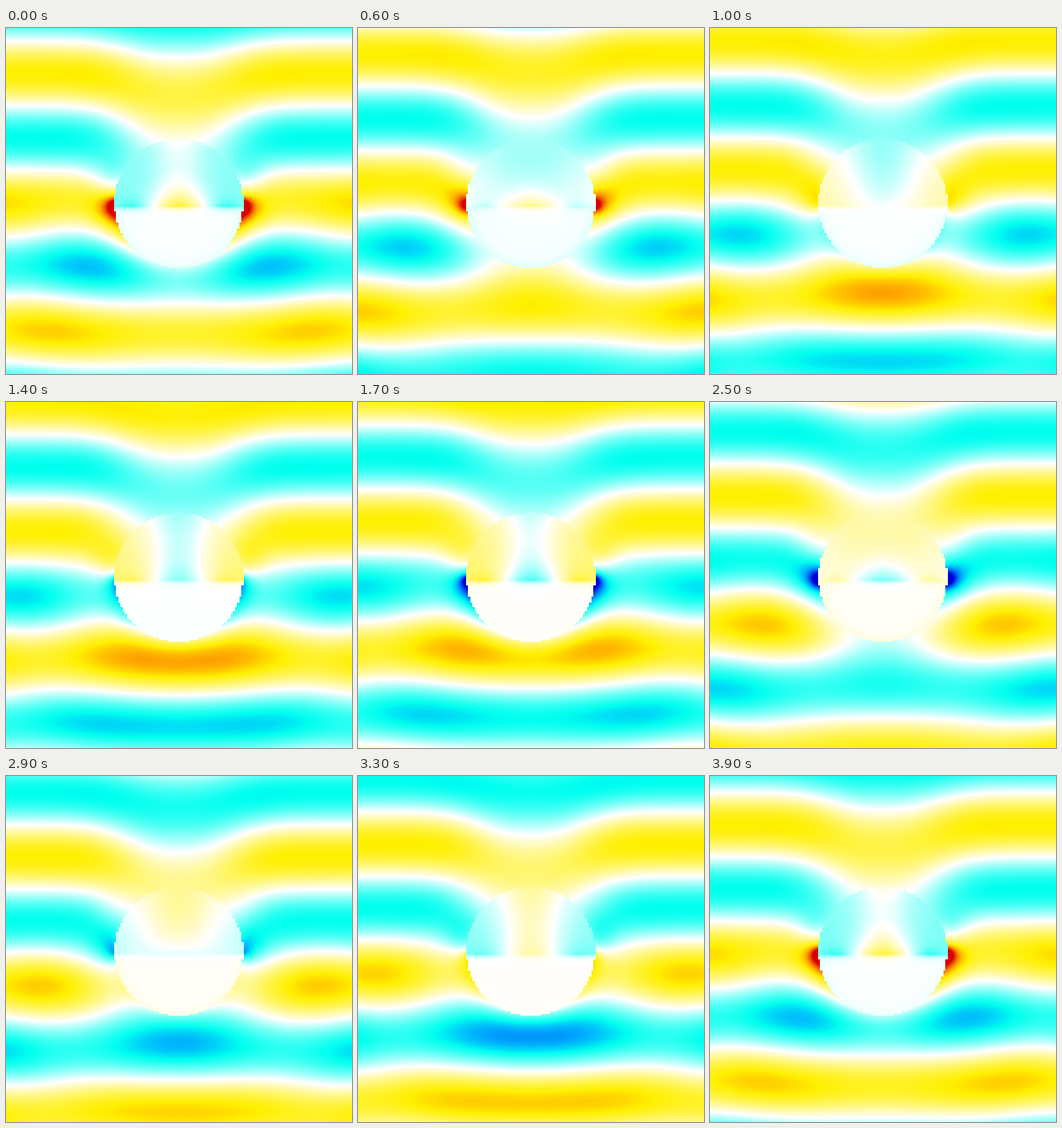
Recreate the animation shown at these times as a matplotlib script. Size 400 px wide and 400 px high, loop 4 s.

```python
import numpy as np
import matplotlib.pyplot as plt
from matplotlib.animation import FuncAnimation
from matplotlib.colors import LinearSegmentedColormap

SIZE, CELL = 400, 2.5
FRAMES, INTERVAL = 40, 100
CX, CY, RADIUS, BASE = 200, 203, 74.5, 206
WAVELENGTH, CREST = 149, 52.5
K = 2 * np.pi / WAVELENGTH


def bell(x, width):
    return np.exp(-(x / width) ** 2)


def polar(size, degrees):
    return size * np.exp(1j * np.radians(degrees))


def outer_field(d, y):
    """Plane wave going up, disturbed by the disc; complex amplitude."""
    r = np.hypot(d, y - CY)
    rise = CY - y

    # Wide, flat-fronted beam behind the disc
    beam = polar(1.2 * bell(rise - 73, 140) * np.exp(-(d / 80) ** 2.6),
                 -159 + 0.42 * (rise - 73) + 0.003 * d ** 2)
    # Round wave thrown back towards the incoming one
    echo = 0.15 + 0.78 * np.exp(-np.maximum(r - 74, 0) / 28)
    echo = echo * np.exp(-1j * K * (r - rise - 210))
    back = 1 / (1 + np.exp((198 - y) / (r / 12 + 1)))
    # Delay along the flanks
    flank = -0.4j * bell(d - 78, 25) * bell(y - 180, 32)

    tip = np.hypot(d - RADIUS, y - 205)
    total = 1 + (1 - back) * beam + back * echo + flank
    total = total * (1 + 1.25 * np.exp(-tip / 9))
    return total * np.exp(1j * K * (y - CREST))


def inner_field(d, y):
    """Weak standing pattern in the upper half, nearly nothing below."""
    h = np.maximum(BASE - y, 0)
    depth = np.maximum(y - BASE, 0)
    p = h / 75
    dome = 0.78 * bell(d, 29) * np.exp(-h / 22)
    strip = 0.4 * bell(d - 54, 15) * np.exp(-h / 7)
    sides = 0.46 * (1 - bell(d, 35))
    neck = 0.8 * p * (1 - p) * bell(d, 40)
    a = dome - strip - sides - neck
    b = 0.33 * (1 - bell(d, 45)) * (1 - p ** 2)
    b = b - 0.5 * bell(d, 42) * (1 - np.exp(-h / 40))

    rim = np.exp((np.hypot(d, y - CY) - RADIUS) / 6)
    tint = (depth > 0) * (0.025 + 0.12 * rim) * (-0.7 + 0.7j)
    return (a - 1j * b) * np.exp(-depth / 3) + tint


pixels = np.arange(SIZE) + 0.5
X, Y = np.meshgrid(pixels, pixels)
D = np.abs(X - CX)

# The disc's edge follows a coarser grid
cells = (np.floor(pixels / CELL) + 0.5) * CELL
CELL_X, CELL_Y = np.meshgrid(cells, cells)
disc = np.hypot(CELL_X - CX, CELL_Y - CY) < RADIUS
field = np.where(disc, inner_field(D, Y), outer_field(D, Y))

LIMIT = 2
COLORS = [
    (-2, (0, 0, 0.85)), (-1.35, (0, 0.66, 1)), (-1, (0, 1, 0.94)),
    (0, (1, 1, 1)),
    (1, (1, 0.94, 0)), (1.35, (1, 0.66, 0)), (2, (0.85, 0, 0)),
]
cmap = LinearSegmentedColormap.from_list(
    "wave", [((v + LIMIT) / (2 * LIMIT), c) for v, c in COLORS], N=1024)

fig = plt.figure(figsize=(4, 4), dpi=100)
ax = fig.add_axes([0, 0, 1, 1])
ax.axis("off")
image = ax.imshow(field.real, cmap=cmap, vmin=-LIMIT, vmax=LIMIT,
                  interpolation="nearest", aspect="auto")


def update(i):
    image.set_data((field * np.exp(2j * np.pi * i / FRAMES)).real)
    return [image]


anim = FuncAnimation(fig, update, frames=FRAMES, interval=INTERVAL,
                     repeat=True, repeat_delay=0)
plt.show()
```
